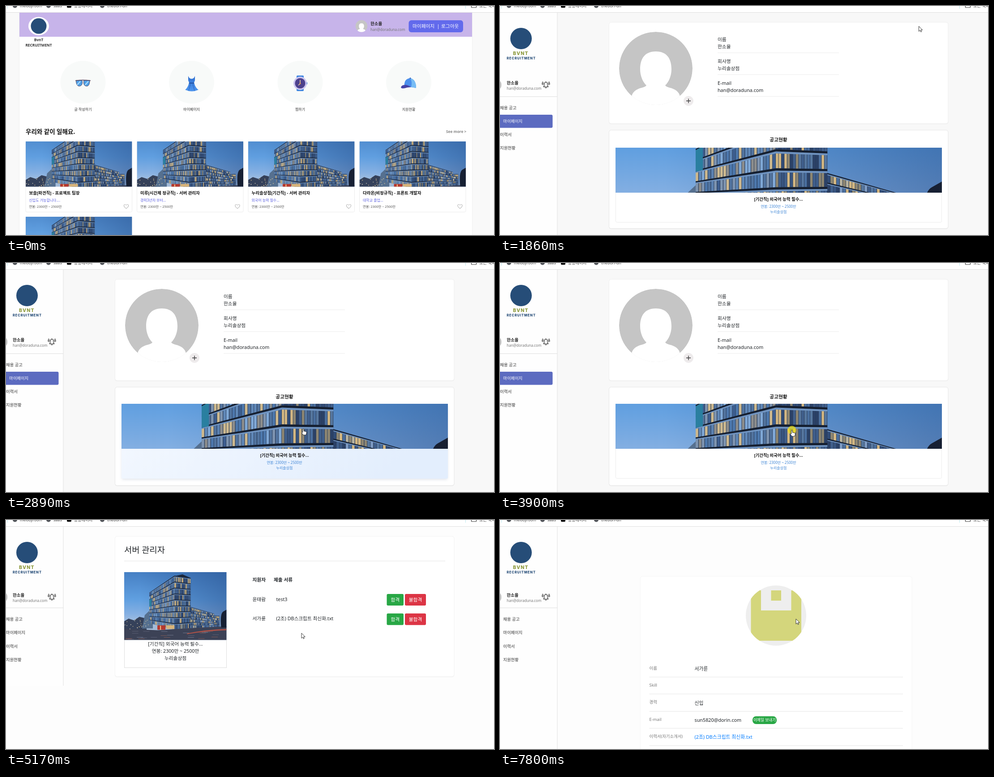
An HTML page that plays this animation: 1090x514 px, repeating every 8000 ms.

```html
<!DOCTYPE html>
<html lang="ko">
<head>
<meta charset="utf-8">
<title>Recruitment</title>
<style>
html, body { margin: 0; width: 100%; height: 100%; overflow: hidden; background: #fff; }
svg { display: block; }
text { font-family: "Noto Sans", "Noto Sans CJK KR", "Noto Sans CJK", sans-serif; }
.logo { font-family: Inter, sans-serif; }
</style>
</head>
<body>
<svg id="stage" width="1090" height="514" viewBox="0 0 1090 514"></svg>
<script>
const USER = '한소율', MAIL = 'han@doraduna.com', FIRM = '누리솔상점', OTHER = '서가륜';
const PAY = '연봉: 2300만 ~ 2500만', FILE = '(2조) DB스크립트 최신화.txt', JOB = '[기간직] 외국어 능력 필수...';
const NAVY = '#264d78', INK = '#212529';

// Drawing helpers
const text = (x, y, s, size = 10.7, fill = INK, weight = 400, anchor = 'start', extra = '') =>
  `<text x="${x}" y="${y}" font-size="${size}" fill="${fill}" font-weight="${weight}" text-anchor="${anchor}" ${extra}>${s}</text>`;
const mid = (x, y, s, size, fill, weight) => text(x, y, s, size, fill, weight, 'middle');
const rect = (x, y, w, h, fill, r = 0, extra = '') =>
  `<rect x="${x}" y="${y}" width="${w}" height="${h}" fill="${fill}" rx="${r}" ${extra}/>`;
const oval = (x, y, rx, ry, fill, extra = '') =>
  `<ellipse cx="${x}" cy="${y}" rx="${rx}" ry="${ry}" fill="${fill}" ${extra}/>`;
const dot = (x, y, r, fill, extra) => oval(x, y, r, r, fill, extra);
const path = (d, fill = 'none', extra = '') => `<path d="${d}" fill="${fill}" ${extra}/>`;
const rule = (x, y, x2, color = '#e6e6e6') => rect(x, y, x2 - x, 1, color);
const group = (id, body, extra = '') => `<g id="${id}" ${extra}>${body}</g>`;
const at = (x, y, body) => `<g transform="translate(${x} ${y})">${body}</g>`;
const photo = (x, y, w, h) => `<use href="#photo" x="${x}" y="${y}" width="${w}" height="${h}"/>`;
const border = c => `stroke="${c}" stroke-width="1"`;

let seed = 7;
const rnd = () => (seed = (seed * 16807) % 2147483647) / 2147483647;
const pick = a => a[Math.floor(rnd() * a.length)];
const mix = (a, b, k) => a + (b - a) * k;

// Glass wall in perspective between two vertical edges [x, top, bottom]
function wall([xa, ta, ba], [xb, tb, bb], cols, rows, tones) {
  const pt = (u, v) => mix(xa, xb, u).toFixed(1) + ' ' + mix(mix(ta, ba, v), mix(tb, bb, v), u).toFixed(1);
  const quad = (u, v, u2, v2, fill) =>
    path(`M${pt(u, v)}L${pt(u2, v)}L${pt(u2, v2)}L${pt(u, v2)}Z`, fill);
  let out = quad(0, 0, 1, 1, '#2b3d5a');
  for (let r = 0; r < rows; r++) {
    for (let c = 0; c < cols; c++)
      out += quad(c / cols, (r + .2) / rows, (c + .84) / cols, (r + 1) / rows, pick(tones));
    out += quad(0, r / rows, 1, (r + .12) / rows, '#151f30') + quad(0, (r + .12) / rows, 1, (r + .22) / rows, '#6f93c0');
  }
  return out;
}

function building() {
  const left = ['#4d78ad', '#6088b8', '#7fa8d6', '#3d5e90', '#5c82b2', '#8c8d8c', '#cdb98f', '#7e94b0', '#52749f'];
  const right = ['#2b4167', '#38547f', '#4a6f9f', '#314c77', '#405f8c', '#8d8672', '#d3b782', '#56779f'];
  let out = rect(0, 0, 228, 152, 'url(#sky)') + rect(0, 0, 228, 152, 'url(#dusk)');
  out += path('M0 110L10 104 22 108 34 100 50 104V130H0Z', '#35415a');
  out += path('M46 96L64 79V126H40Z', '#56708f');
  out += wall([178, 96, 122], [212, 98, 122], 12, 5, right.concat('#e4cf9f', '#93a3b8'));
  out += wall([148, 78, 125], [200, 93, 123], 24, 7, right.concat('#8296b3', '#b8b39f', '#7f9cc4'));
  out += wall([56, 46, 114], [112, 8, 128], 26, 9, left);
  out += wall([112, 8, 128], [148, 13, 125], 18, 9, right);
  out += path('M56 62L61 59V76L56 77Z', '#2a7fa0') + path('M130 5L148 13 112 9Z', '#1b273c');
  out += path('M0 126L74 130 150 125 228 121V152H0Z', '#3c4256');
  out += rect(74, 119, 18, 10, '#b5382e') + rect(80, 120, 2, 9, '#f3c98a') + rect(94, 119, 18, 8, '#d8b47a');
  for (let i = 0; i < 24; i++) {
    out += dot(mix(0, 54, rnd()).toFixed(1), mix(106, 128, rnd()).toFixed(1), .8, pick(['#f0d49a', '#fff1cf']));
    out += rect(mix(0, 200, rnd()).toFixed(1), mix(131, 150, rnd()).toFixed(1), 14, .6, pick(['#8c93a8', '#6b6f85', '#a46a5c']));
  }
  out += path('M140 137Q185 128 228 127V130Q185 131 140 139Z', '#a95148');
  return out + path('M216 124Q213 92 221 88L228 84V124Z', '#172033');
}

const defs = `<defs>
<linearGradient id="sky" x2="0" y2="1"><stop stop-color="#4680c4"/><stop offset=".4" stop-color="#609fe0"/><stop offset=".62" stop-color="#86b0e2"/><stop offset=".78" stop-color="#b0c6e0"/></linearGradient>
<linearGradient id="dusk"><stop offset=".15" stop-color="#234a86" stop-opacity="0"/><stop offset="1" stop-color="#234a86" stop-opacity=".5"/></linearGradient>
<linearGradient id="glow" x2="1" y2=".3"><stop stop-color="#f5f9ff"/><stop offset="1" stop-color="#e3eefd"/></linearGradient>
<linearGradient id="blue" x2="0" y2="1"><stop stop-color="#2f6fd0"/><stop offset="1" stop-color="#4f96ee"/></linearGradient>
<filter id="soft" x="-5%" y="-20%" width="110%" height="140%"><feGaussianBlur stdDeviation="3"/></filter>
<clipPath id="round"><circle cx="616.5" cy="214.5" r="67.5"/></clipPath>
<clipPath id="face"><circle r="82"/></clipPath>
<symbol id="photo" viewBox="0 0 228 152" preserveAspectRatio="xMidYMid slice">${building()}</symbol>
<g id="person" clip-path="url(#face)">${dot(0, 0, 82, '#c5c5c5')}${path('M0-38C26-38 35-20 35 2C35 18 28 32 21 38C24 43 34 43 41 47C49 51 53 57 54 63V84H-54V63C-53 57-49 51-41 47C-34 43-24 43-21 38C-28 32-35 18-35 2C-35-20-26-38 0-38Z', '#fff')}</g>
</defs>`;

const person = (x, y, r) => `<use href="#person" transform="translate(${x} ${y}) scale(${r / 82})"/>`;

function toolbar() {
  let out = rect(0, 0, 1090, 14, '#fff') + rule(0, 14, 1090, '#dedede') + rect(3, 0, 1, 6, '#bdeaf0') + rect(1026, 0, 1, 6, '#bdeaf0');
  [[20, 'melodyroom'], [95, 'saas'], [0, '공공데이터', 152], [215, 'thebori-un']].forEach(([x, s, tx]) => {
    out += (x ? dot(x, -.5, 5, '#55585d') : rect(136, -6, 10, 10, '#111', 2)) + text(tx || x + 11, 2.6, s, x === 20 ? 8.2 : 9, '#444');
  });
  return out + rect(1039.5, -5, 11, 8.5, 'none', 1, 'stroke="#444" stroke-width="1.2"') + text(1057, 2.6, '모든 북마크', 9.4, '#444');
}

const icons = [
  path('M156.500 167H169.500Q171 167 170.500 173Q169.500 180 163 180Q156.500 179 156.500 167ZM173.500 167H187Q187 179 181 180Q174 180 173.500 173Z', '#4f9fe6', 'stroke="#574b66" stroke-width="1"') +
    path('M155 167.500Q172 165 189 167.500', 'none', 'stroke="#574b66" stroke-width="1.500"') + path('M159 177L166 169M177 177L184 169', 'none', 'stroke="#a9dcff" stroke-width="2.500"'),
  path('M407 157L409 161Q414.500 166 420 161L422 157V167L420 172Q423 184 430 188Q415 195 400 188Q406 184 409 172L407 167Z', 'url(#blue)') +
    path('M409 172H420V174H409Z', '#214e9d') + path('M412 175L408 190M417 175L421 190', 'none', 'stroke="#2a63bd"'),
  rect(649, 156, 16, 35, '#3f86e0', 2) + rect(670, 171, 3, 5, '#3c7cd4', 1) + dot(657, 173.500, 15, '#cbc5f0') + dot(657, 173.500, 11.500, '#4d418d') +
    path('M657 166V174L653 178', 'none', 'stroke="#f5d9a0" stroke-width="1.500"') + dot(657, 174, 1.500, '#f0a040'),
  path('M890 182Q888 163 903 162Q916 165 916 184Q902 181 890 182Z', '#4b8fec') + path('M903 162Q916 165 916 184L905 182Q908 170 903 162Z', '#78bdf4') +
    path('M892 177Q883 177 882 183Q884 187 896 183L905 182Q897 177 892 177Z', '#4543a8') + dot(903, 162, 1.500, '#3766bd')
];

function jobCard(x, y, title, desc) {
  const heart = path('M0 5C-9-1-4-7 0-2.500C4-7 9-1 0 5Z', 'none', 'stroke="#b8b8b8" stroke-width="1.100"');
  return rect(x, y + .5, 237.5, 158, '#fff', 3, border('#ececec')) + photo(x, y, 237.5, 101.5) +
    text(x + 7.5, y + 119, title, 9.5, '#111', 700) + text(x + 7.5, y + 135, desc, 8, '#5a5fe0') +
    text(x + 7.5, y + 149, PAY, 7.4, '#555') + at(x + 224.5, y + 145.5, heart);
}

function home() {
  let out = rect(0, 15, 1090, 499, '#f9f9f9') + rect(29.5, 15, 1012, 510, '#fff', 0, border('#f1f1f1')) + rect(30, 15, 1011, 54, '#c7b4ea') +
    oval(73, 45, 23, 20.5, '#fff') + dot(73, 45, 17.5, NAVY) +
    mid(73, 79, 'BvnT', 8.3, '#333', 600) + mid(73, 90.5, 'RECRUITMENT', 8.3, '#333', 600) +
    person(794, 45, 13.5) + text(814, 43, USER, 9.5, '#222', 700) + text(814, 56, MAIL, 8.1, '#777') +
    rect(899.5, 32, 121.5, 27, '#626aec', 6) + text(908, 49, '마이페이지', 10.7, '#fff', 500) +
    mid(965.5, 49, '|', 10.7, '#fff', 500) + text(972, 49, '로그아웃', 10.7, '#fff', 500) +
    text(44, 287, '우리와 같이 일해요.', 13.5, '#111', 700) + text(983, 284.5, 'See more &gt;', 8.3, '#888', 600);
  ['글 작성하기', '마이페이지', '찜하기', '지원현황'].forEach((s, i) => {
    const x = 172 + i * 242.5;
    out += oval(x, 171, 50.5, 48, '#f8faf9') + icons[i] + mid(x, 235, s, 8.05, '#333');
  });
  [['보솔[파견직] - 프로젝트 팀장', '신입도 가능합니다....'], ['미루[시간제 정규직] - 서버 관리자', '경력3년차 부터...'],
   [FIRM + '[기간직] - 서버 관리자', '외국어 능력 필수...'], ['다라온[비정규직] - 프론트 개발자', '대학교 졸업...'], ['', '']]
    .forEach(([title, desc], i) => out += jobCard(44 + i % 4 * 248.5, i < 4 ? 304 : 473, title, desc));
  return out;
}

const bell = path('M-5 4.500Q-3.500 3-3.500-1Q-3.500-5.500 0-6Q3.500-5.500 3.500-1Q3.500 3 5 4.500ZM-1.500 6Q0 8 1.500 6M0-6V-7.500M-5-5Q-6.500-3-6.500 0M5-5Q6.500-3 6.500 0M-7-7Q-8.500-4-8.500-1M7-7Q8.500-4 8.500-1',
  'none', 'stroke="#222" stroke-width="1.150" stroke-linecap="round"');

// dy: vertical shift of the profile block; menu: x, first baseline, step, active row
function sidebar(dy, [x, y, step, active], bottom) {
  let out = rect(0, 15, 128, bottom - 15, '#fefefe') + rect(127.5, 15, 1, bottom - 15, '#e0e0e0') + dot(47, 73, 24, NAVY) +
    text(29, 110, 'BVNT', 10.5, '#8c993c', 800, 'start', 'class="logo" letter-spacing="1.1"') +
    text(15, 120, 'RECRUITMENT', 7.4, NAVY, 800, 'start', 'class="logo" letter-spacing=".95"') +
    person(-10, 177 + dy, 13.5) + text(15, 175.5 + dy, USER, 9.5, '#222', 700) + text(15, 188 + dy, MAIL, 8.1, '#777') +
    at(102.5, 177 + dy, bell) + rule(0, 203 + dy * 1.6, 128, '#dedede');
  ['채용 공고', '마이페이지', '이력서', '지원현황'].forEach((s, i) => {
    const on = i === active, by = y + i * step;
    if (on) out += rect(-5, by - 18, 122.5, 29.5, '#5c6bc0', 3);
    out += text(on ? 7 : x, by, s, 9.4, on ? '#fff' : '#333', on ? 500 : 400);
  });
  return out;
}

const panel = (x, y, w, h, c) => rect(x, y + 1, w, h, '#000', 5, 'opacity=".035"') + rect(x + .5, y + .5, w - 1, h - 1, '#fff', 5, border(c));

function profile() {
  let out = rect(0, 15, 1090, 499, '#f8f8f8') + sidebar(0, [0, 232, 30, 1], 514) +
    panel(243, 36, 758.5, 228.5, '#efefef') + panel(243, 278, 758.5, 222, '#e6e6e6') + person(348, 140, 82) +
    dot(421, 213, 11, '#eeebec') + path('M416 213H426M421 208V218', 'none', 'stroke="#333" stroke-width="1.300"');
  [['이름', USER], ['회사명', FIRM], ['E-mail', MAIL]].forEach(([k, v], i) => {
    const y = 79 + i * 49;
    out += text(486, y, k) + text(486, y + 15.5, v) + rule(486, y + 25.5, 757, '#ececec');
  });
  return out + mid(622, 304, '공고현황', 10.7, '#111', 700) + group('card',
    group('shade', rect(259, 323, 727, 165, '#7a8ba5', 3, 'filter="url(#soft)" opacity=".24"')) +
    rect(258.5, 318.5, 728, 167, '#fff', 3, border('#ececec')) +
    group('tint', rect(258, 318, 729, 168, 'url(#glow)', 3)) + photo(258, 318, 729, 101) +
    mid(622, 437, JOB, 9.5, '#111', 700) + mid(622, 453, PAY, 8, '#3f86d6') + mid(622, 465, FIRM, 8, '#3f86d6'));
}

function applicants() {
  let out = rect(0, 15, 1090, 499, '#fdfdfd') + sidebar(-4, [0, 226, 30.4, -1], 372) + panel(243, 36, 758.5, 316, '#f3f3f3') +
    text(264, 74, '서버 관리자', 18.7, INK, 500) + rule(264, 91.5, 981, '#e4e4e4') +
    rect(264.5, 117.5, 228, 214, '#fff', 0, border('#dedede')) + photo(264, 117, 228.5, 152.5) +
    mid(378.5, 282, JOB) + mid(378.5, 298, PAY) + mid(378.5, 314, FIRM) +
    text(550.5, 137.5, '지원자', 10.7, INK, 700) + text(598, 137.5, '제출 서류', 10.7, INK, 700);
  [['윤태람', 'test3'], [OTHER, FILE]].forEach(([who, file], i) => {
    const y = 166 + i * 43.7;
    out += text(550.5, y + 15.5, who) + text(603.5, y + 15.5, file) +
      rect(850.5, y, 37.5, 26, '#28a745', 2.7) + mid(869.3, y + 17.3, '합격', 10.7, '#fff') +
      rect(891, y, 47, 26, '#dc3545', 2.7) + mid(914.5, y + 17.3, '불합격', 10.7, '#fff');
  });
  return out;
}

function resume() {
  const olive = '#d4d67c', pale = '#eeeeee';
  let out = rect(0, 15, 1090, 499, '#fdfdfd') + sidebar(-4, [7, 226, 30.4, -1], 514) + panel(313, 126, 607.5, 400, '#f6f6f6') +
    `<g clip-path="url(#round)">${rect(549, 147, 135, 135, pale)}${rect(560.5, 158, 112.5, 113, olive)}${rect(583, 158, 67.5, 45, pale)}${rect(605.5, 158, 22.5, 23, olive)}</g>`;
  [['이름', OTHER], ['Skill', ''], ['경력', '신입'], ['E-mail', 'sun5820@dorin.com'], ['이력서(자기소개서)', FILE]].forEach(([k, v], i) => {
    const y = 335.5 + i * 38.4;
    out += text(333.5, y, k, 9.4, '#777') + text(434.5, y + 2.2, v, 10.8, i === 4 ? '#007bff' : INK, 500) + rule(333.5, Math.round(y + 16.5), 900);
  });
  return out + rect(564, 440.5, 54, 17.5, '#28a745', 8) + mid(591, 452.3, '이메일 보내기', 8.7, '#fff', 500);
}

const outline = 'stroke="#222" stroke-width=".9" stroke-linejoin="round"';
const stage = document.getElementById('stage');
stage.innerHTML = defs + group('home', home()) + group('profile', profile()) + group('applicants', applicants()) + group('resume', resume()) +
  toolbar() + group('cursor', dot(0, 0, 9.5, '#f0e010', 'id="click" opacity=".72"') +
  group('arrow', path('M0 0V11.500L2.700 9 4.500 12.800 6.200 12 4.500 8.300H8.200Z', '#fff', outline)) +
  group('hand', path('M-1.200 1Q0-.7 1.200 1V5.300L6 6.300Q7.600 6.800 7.400 9L6.300 14H0L-3.600 9Q-3.700 7.300-2.200 7.700L-1.200 8.700Z', '#fff', outline)));

const LOOP = 8000;
const el = id => document.getElementById(id);
const show = (id, on) => el(id).style.display = on ? '' : 'none';
const pages = [['home', 0], ['profile', 1730], ['applicants', 3970], ['resume', 7130]];
const clicks = [[1570, 1730], [3830, 3970], [6600, 6670]];
const hands = [[860, 1730], [2750, 4650], [5420, 7130]];
const within = (spans, t) => spans.some(([a, b]) => t >= a && t < b);

// Cursor stops: time, x, y
const stops = [[130, 1052, 440], [510, 995, 235], [890, 935.5, 45.5], [1930, 935.5, 45.5], [2480, 745, 208], [2890, 664, 372], [3110, 652, 375], [4580, 652, 375],
  [5170, 660, 254], [5390, 660, 232], [5660, 658, 220.5], [7130, 658, 220.5], [7131, 660, 221], [7730, 660, 221], [7731, 661, 222], [LOOP, 661, 222]];

function cursorAt(t) {
  const i = Math.max(1, stops.findIndex(s => s[0] >= t));
  const [a, b] = [stops[i - 1], stops[i]];
  const k = Math.max(0, (t - a[0]) / (b[0] - a[0]));
  return [mix(a[1], b[1], k), mix(a[2], b[2], k)];
}

function draw(now) {
  const t = now % LOOP;
  pages.forEach(([id, from], i) => show(id, t >= from && t < (pages[i + 1] || [0, LOOP])[1]));
  const hover = Math.min(1, Math.max(0, (t - 2750) / 130));
  const lit = t < 3900 ? hover : 0;
  el('card').setAttribute('transform', `translate(0 ${-2 * hover})`);
  el('tint').setAttribute('opacity', lit);
  el('shade').setAttribute('opacity', lit);
  const hand = within(hands, t);
  show('cursor', t >= 130);
  show('hand', hand);
  show('arrow', !hand);
  show('click', within(clicks, t));
  el('cursor').setAttribute('transform', `translate(${cursorAt(t).map(v => v.toFixed(1)).join(' ')})`);
}

const start = performance.now();
function tick() {
  draw(performance.now() - start);
  requestAnimationFrame(tick);
}
tick();
</script>
</body>
</html>
```
